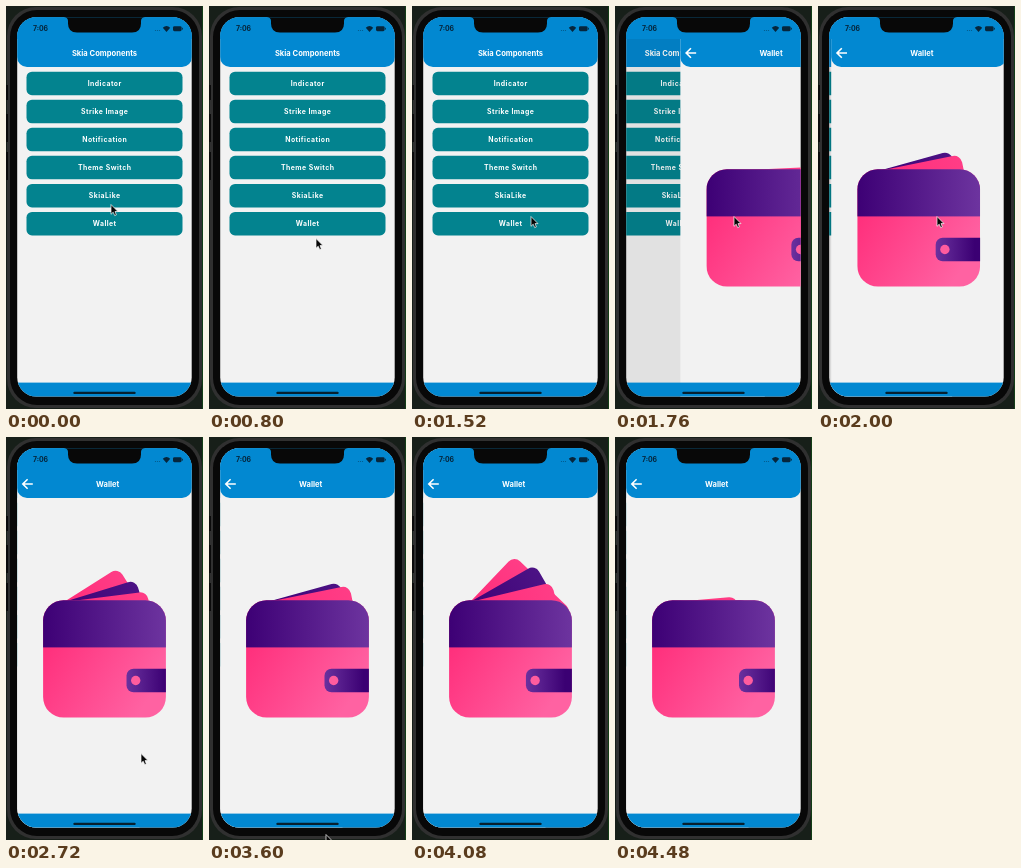
Write an HTML page that moves like this. It is 197 px wide and 403 px high and loops after 4.56 s.

```html
<!DOCTYPE html>
<html lang="en">
<head>
<meta charset="utf-8">
<title>Wallet animation</title>
<style>
  html, body { margin: 0; width: 100%; height: 100%; overflow: hidden; background: #171f19; }
  svg { display: block; width: 100vw; height: 100vh; }
  text { font-family: Inter, Roboto, sans-serif; font-weight: 700; fill: #fff; text-anchor: middle; }
  .title { font-size: 7.6px; }
  .label { font-size: 6.9px; letter-spacing: .45px; }
  .clock { font-size: 6.9px; fill: #06263c; }
</style>
</head>
<body>
<svg viewBox="0 0 197 403" preserveAspectRatio="none">
  <defs>
    <clipPath id="screen"><rect x="11.2" y="11.2" width="174.5" height="379.4" rx="19"/></clipPath>
    <clipPath id="body"><rect x="37.1" y="163.2" width="122.8" height="117.4" rx="20.5"/></clipPath>
    <linearGradient id="purple"><stop stop-color="#3d0075"/><stop offset="1" stop-color="#6d349f"/></linearGradient>
    <linearGradient id="strap"><stop stop-color="#6a319e"/><stop offset=".65" stop-color="#3b0073"/></linearGradient>
    <linearGradient id="pink" x1="0" y1="0" x2="1" y2=".6"><stop offset=".1" stop-color="#ff2a78"/><stop offset="1" stop-color="#ff62a2"/></linearGradient>
    <linearGradient id="pinkCard"><stop stop-color="#ff2a78"/><stop offset="1" stop-color="#ff3d86"/></linearGradient>
    <linearGradient id="purpleCard"><stop stop-color="#3d0075"/><stop offset="1" stop-color="#4c1385"/></linearGradient>
  </defs>

  <rect width="197" height="403" fill="#171f19"/>
  <rect x="196" width="1" height="403" fill="#123d16"/>
  <rect x="1" y="1" width="195" height="401" rx="29" fill="#303030"/>
  <rect x="4" y="4" width="189" height="395" rx="27" fill="#080808"/>
  <g fill="#0b0b0b">
    <rect y="79" width="2" height="15"/>
    <rect y="108" width="2" height="28"/>
    <rect y="146" width="2" height="28"/>
  </g>

  <g clip-path="url(#screen)">
    <g id="menu">
      <rect x="11" y="11" width="175" height="380" fill="#f2f2f2"/>
      <rect x="11" y="0" width="175" height="61" rx="10" fill="#0288d1"/>
      <text class="title" x="98.5" y="49.5">Skia Components</text>
      <g id="list"></g>
      <rect id="dim" x="11" y="11" width="175" height="380" opacity="0"/>
    </g>
    <g id="page">
      <rect x="11" y="11" width="175" height="380" fill="#f2f2f2"/>
      <rect x="11" y="0" width="175" height="61" rx="10" fill="#0288d1"/>
      <text class="title" x="101.7" y="49.5">Wallet</text>
      <path d="M26.8 47H17.2M21.6 42.2L16.8 47L21.6 51.8" fill="none" stroke="#fff" stroke-width="1.6"/>
      <g id="cards"></g>
      <g clip-path="url(#body)">
        <rect x="37" y="163" width="123" height="118" fill="url(#pink)"/>
        <rect x="37" y="163" width="123" height="47.4" fill="url(#purple)"/>
        <g id="clasp">
          <rect x="124" y="231.8" width="60" height="23.4" rx="7" fill="url(#strap)"/>
          <circle cx="133.2" cy="243.5" r="4.7" fill="#ff5c9e"/>
        </g>
      </g>
    </g>
    <rect x="11" y="11" width="175" height="22" fill="#0288d1"/>
    <rect x="11" y="376.6" width="175" height="15" fill="#0288d1"/>
    <rect x="67.3" y="385.8" width="62.4" height="2.3" rx="1.1" fill="#06202f"/>
    <path d="M58 11H139Q135 11.5 135 15V17.5Q135 26.5 126 26.5H71Q62 26.5 62 17.5V15Q62 11.5 58 11Z" fill="#080808"/>
    <text class="clock" x="34.5" y="25.3">7:06</text>
    <g fill="#06263c">
      <g opacity=".5"><circle cx="149.5" cy="24.5" r=".6"/><circle cx="151.5" cy="24.5" r=".6"/><circle cx="153.5" cy="24.5" r=".6"/></g>
      <path d="M156.8 21.8Q160.5 18.2 164.2 21.8L160.5 26Z"/>
      <rect x="167" y="20.2" width="8.6" height="5" rx="1.4"/>
      <rect x="176" y="21.8" width=".8" height="1.8"/>
    </g>
  </g>
  <path id="cursor" d="M0 -.5V9.3L2.2 7.2L3.7 10.6L5.4 9.9L4 6.6H7Z" fill="#050505" stroke="#fff" stroke-width=".7"/>
</svg>
<script>
const LOOP = 4560, STEP = 80, WIDTH = 175;
const PUSH = 1616, OPEN = 1600, CYCLE = 1600;
const PIVOT = [58, 165];
const $ = id => document.getElementById(id);

function add(parent, tag, attrs, text = '') {
  const el = document.createElementNS('http://www.w3.org/2000/svg', tag);
  for (const k in attrs) el.setAttribute(k, attrs[k]);
  el.textContent = text;
  return parent.appendChild(el);
}

['Indicator', 'Strike Image', 'Notification', 'Theme Switch', 'SkiaLike', 'Wallet'].forEach((name, i) => {
  const y = 65.7 + i * 28.05;
  add($('list'), 'rect', { x: 20.5, y, width: 156, height: 23.5, rx: 5.5, fill: '#03838f' });
  add($('list'), 'text', { class: 'label', x: 98.7, y: y + 14.2 }, name);
});

// Back to front: reach from the pivot, widest angle, rise start/end, fall start/end.
const cards = [
  { reach: 64, angle: 48, times: [310, 570, 980, 1360], fill: 'url(#pinkCard)' },
  { reach: 75, angle: 31, times: [180, 620, 940, 1340], fill: 'url(#purpleCard)' },
  { reach: 84, angle: 14, times: [0, 560, 940, 1320], fill: 'url(#pinkCard)' }
];
const clasp = { shift: 10.5, times: [0, 560, 880, 1280] };
for (const c of cards) {
  c.el = add($('cards'), 'rect', { x: -10, y: 0, width: c.reach + 10, height: 80, rx: 8, fill: c.fill });
}

const ease = s => (1 - Math.cos(Math.PI * Math.min(1, Math.max(0, s)))) / 2;
const ramp = (t, a, b) => ease((t - a) / (b - a));

function openness(t, [a, b, c, d]) {
  const settle = 1 - .04 * ramp(t, b, c);
  return ramp(t, a, b) * settle * (1 - ramp(t, c, d));
}

// Critically damped spring for the screen push.
function remaining(t) {
  const w = Math.max(0, t - PUSH) * .0166;
  return t > 2160 ? 0 : (1 + w) * Math.exp(-w);
}

// Pointer stops: time, x, y.
const stops = [
  [0, 105, 199], [560, 105, 199], [800, 107, 233], [880, 107, 233], [1360, 119, 211],
  [2160, 119, 211], [2640, 135, 317], [2720, 135, 317], [3040, 131, 372],
  [3200, 131, 372], [3600, 117, 398], [3760, 116, 405], [LOOP, 116, 405]
];
function pointer(t) {
  const i = stops.findIndex(s => s[0] > t);
  const [t0, x0, y0] = stops[i - 1], [t1, x1, y1] = stops[i];
  const s = ramp(t, t0, t1);
  return [x0 + (x1 - x0) * s, y0 + (y1 - y0) * s];
}

const move = (el, x, y = 0) => el.setAttribute('transform', `translate(${x} ${y})`);

function draw(t) {
  const left = remaining(t);
  move($('page'), WIDTH * left);
  move($('menu'), -.3 * WIDTH * (1 - left));
  $('dim').setAttribute('opacity', .1 * (1 - left));

  const phase = t < OPEN ? 0 : (t - OPEN) % CYCLE;
  for (const c of cards) {
    const turn = -c.angle * openness(phase, c.times);
    c.el.setAttribute('transform', `translate(${PIVOT}) rotate(${turn})`);
  }
  move($('clasp'), -clasp.shift * openness(phase, clasp.times));
  move($('cursor'), ...pointer(t));
}

function tick() {
  const t = performance.now() % LOOP;
  draw(Math.floor(t / STEP) * STEP);
  requestAnimationFrame(tick);
}
tick();
</script>
</body>
</html>
```
